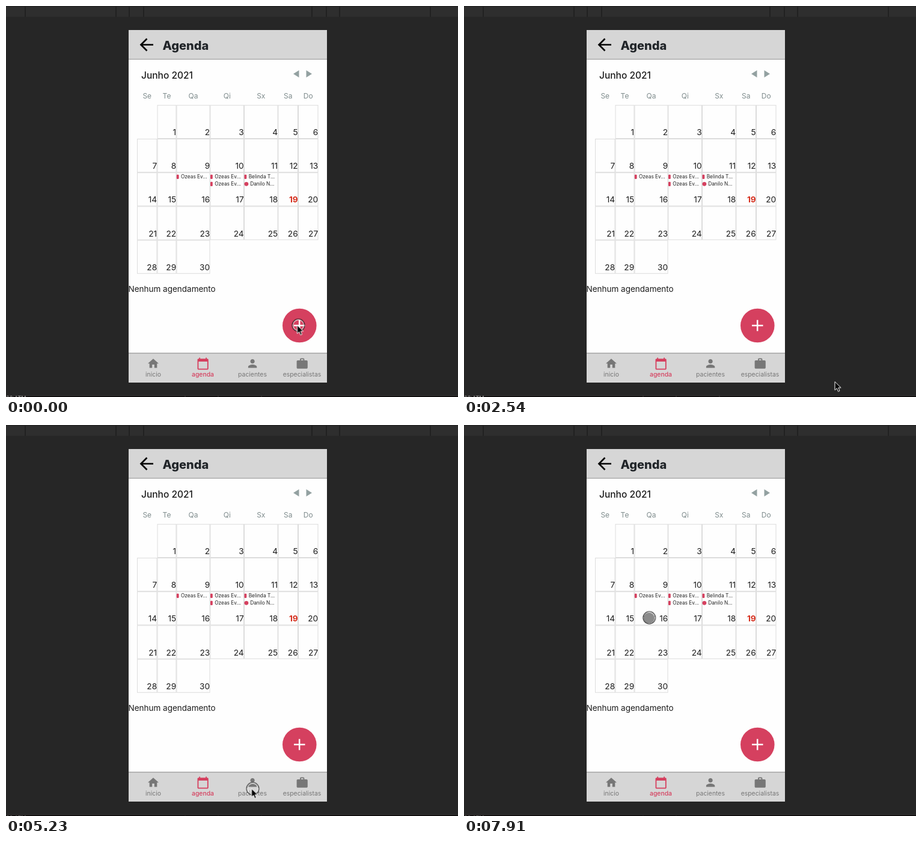
An HTML page for the animation above (8000 ms loop, 752 by 651 pixels).

```html
<!DOCTYPE html>
<html lang="pt">
<head>
<meta charset="utf-8">
<title>Agenda</title>
<style>
html, body { margin: 0; width: 100%; height: 100%; overflow: hidden; background: #262626; }
svg { display: block; width: 752px; height: 651px; font-family: Inter, "Open Sans", sans-serif; }
.title { font-size: 20px; font-weight: 800; fill: #212529; }
.month { font-size: 15.5px; font-weight: 500; fill: #1c1c1c; }
.week { font-size: 12px; fill: #7f8c8d; text-anchor: middle; }
.day { font-size: 13.7px; fill: #1c1c1c; text-anchor: end; }
.today { font-weight: 700; fill: #d6301f; }
.event { font-size: 8.3px; fill: #222; }
.note { font-size: 13.5px; fill: #1c1c1c; }
.tab { font-size: 10.4px; text-anchor: middle; }
.tabs { fill: #777; }
.active { fill: #d5405f; }
.active .tab { font-weight: 500; }
.cell { fill: none; stroke: #dcdcdc; }
.accent { fill: #d5405f; }
.strip { font-size: 9px; fill: #aaa; }

.pointer, .ring, .disc, .strip { animation: 8s step-end infinite; }
.pointer { animation-name: point; }
.ring { animation-name: ring; }
.disc { animation-name: touch; }
.strip { animation-name: strip; }

@keyframes point {
  0% { transform: translate(484.5px, 531.5px); }
  20.625% { transform: translate(487.5px, 538.5px); }
  22.5% { transform: translate(494px, 552px); }
  24.375% { transform: translate(513px, 578px); }
  26.25% { transform: translate(546px, 602px); }
  28% { transform: translate(580px, 616px); }
  29.875% { transform: translate(607px, 624px); }
  31.75% { transform: translate(617px, 625.5px); }
  33.625% { transform: translate(541px, 616px); }
  35.5% { transform: translate(480px, 608px); }
  37.375% { transform: translate(440px, 603px); }
  39.25% { transform: translate(418px, 601px); }
  41.125% { transform: translate(409px, 601px); }
  42.875% { transform: translate(406.5px, 602px); }
  46.625% { transform: translate(407.5px, 604px); }
  48.5% { transform: translate(408.5px, 605.5px); visibility: visible; }
  69.125%, 100% { transform: translate(408.5px, 605.5px); visibility: hidden; }
}
@keyframes ring {
  0% { transform: translate(486.5px, 531.5px); visibility: visible; }
  1.875% { transform: translate(410.5px, 605.5px); visibility: hidden; }
  65.375% { transform: translate(410.5px, 605.5px); visibility: visible; }
  67.25% { transform: translate(410.5px, 605.5px); visibility: hidden; }
  91.625% { transform: translate(410.5px, 599.5px); visibility: visible; }
  93.5% { transform: translate(404px, 560px); }
  95.25% { transform: translate(380px, 480px); }
  97.125% { transform: translate(336px, 376px); }
  98.875%, 100% { transform: translate(308.3px, 320.8px); visibility: visible; }
}
@keyframes touch {
  0% { transform: translate(410px, 605px); visibility: hidden; }
  69.125% { transform: translate(410px, 604px); visibility: visible; }
  71% { transform: translate(410px, 603px); }
  91.625% { transform: translate(410px, 600px); }
  93.5% { transform: translate(403.5px, 560.5px); }
  95.25% { transform: translate(379.5px, 480.5px); }
  97.125% { transform: translate(335.5px, 376.5px); }
  98.875%, 100% { transform: translate(307.8px, 321.3px); visibility: visible; }
}
@keyframes strip {
  0% { opacity: 1; transform: none; }
  65.375%, 100% { opacity: .6; transform: translateY(1px); }
}
</style>
</head>
<body>
<svg viewBox="0 0 752 651">
  <rect width="752" height="651" fill="#262626"/>
  <rect width="752" height="18" fill="#2e2e2e"/>
  <rect width="752" height="1.5" fill="#242424"/>
  <path d="M32 1v17M183 1v17M205 1v17M229 1v17M509 1v17M533 1v17M555 1v17M706 1v17" stroke="#1e1e1e" stroke-width="1.5"/>
  <rect y="648" width="752" height="1" fill="#383636"/>
  <rect y="649" width="752" height="2" fill="#110f0f"/>
  <g class="strip">
    <text x="0" y="656">00:ATM</text>
    <path d="M298 649v2M353 649v2M425 649v2" stroke="#3a3838"/>
  </g>

  <rect x="204" y="40" width="330" height="587" fill="#fefefe"/>
  <rect x="204" y="40" width="330" height="48" fill="#d6d6d6"/>
  <rect x="204" y="88" width="330" height="1.3" fill="#a2a2a2"/>
  <path d="M245 64.5H225.5M234.5 54.5l-10 10 10 10" fill="none" stroke="#000" stroke-width="2.7"/>
  <text class="title" x="260.5" y="73">Agenda</text>

  <text class="month" x="225" y="121">Junho 2021</text>
  <path d="M478 113l9.5-6v12zM509 113l-9.5-6v12z" fill="#93a1a1"/>
  <g id="calendar"></g>
  <text class="note" x="203.5" y="476">Nenhum agendamento</text>

  <circle class="accent" cx="488.3" cy="532" r="28.3"/>
  <path d="M479 532h18.5M488.2 522.7v18.5" stroke="#fff" stroke-width="2.5"/>

  <rect x="204" y="577.5" width="330" height="49.5" fill="#d6d6d6"/>
  <rect x="204" y="577.5" width="330" height="1.2" fill="#999"/>
  <g class="tabs">
    <path transform="translate(234.2 584.5) scale(.9)" d="M10 20v-6h4v6h5v-8h3L12 3 2 12h3v8z"/>
    <text class="tab" x="245" y="617">inicio</text>
    <g class="active">
      <path transform="translate(316.7 584.6) scale(.91)" d="M20 3h-1V1h-2v2H7V1H5v2H4c-1.1 0-2 .9-2 2v16c0 1.1.9 2 2 2h16c1.1 0 2-.9 2-2V5c0-1.1-.9-2-2-2zm0 18H4V8h16v13z"/>
      <text class="tab" x="327.5" y="617">agenda</text>
    </g>
    <path transform="translate(399.3 584.5) scale(.9)" d="M12 12c2.21 0 4-1.79 4-4s-1.79-4-4-4-4 1.79-4 4 1.79 4 4 4zm0 2c-2.67 0-8 1.34-8 4v2h16v-2c0-2.66-5.33-4-8-4z"/>
    <text class="tab" x="410" y="617">pacientes</text>
    <path transform="translate(481.8 584.6) scale(.91)" d="M20 6h-4V4c0-1.1-.9-2-2-2h-4c-1.1 0-2 .9-2 2v2H4c-1.1 0-2 .9-2 2v11c0 1.1.9 2 2 2h16c1.1 0 2-.9 2-2V8c0-1.1-.9-2-2-2zm-6 0h-4V4h4v2z"/>
    <text class="tab" x="492.5" y="617">especialistas</text>
  </g>

  <g class="ring" fill="none">
    <circle r="10.2" stroke="#000" stroke-width="1.1"/>
    <circle r="9.1" stroke="#fff" stroke-width="1.1"/>
  </g>
  <circle class="disc" r="9.3" fill="#000" fill-opacity=".45"/>
  <path class="pointer" d="M0 0V14L3.3 11 5.5 16.3 8 15.2 5.8 10H10.2Z" fill="#000" stroke="#fff"/>
</svg>
<script>
const calendar = document.getElementById('calendar');
const edges = [218, 251.5, 283.5, 339.5, 396, 452.5, 486, 519.5];
const top0 = 165, rowHeight = 56.2;

function add(tag, attrs, text = '') {
  const el = document.createElementNS('http://www.w3.org/2000/svg', tag);
  for (const key in attrs) el.setAttribute(key, attrs[key]);
  el.textContent = text;
  calendar.append(el);
}

['Se', 'Te', 'Qa', 'Qi', 'Sx', 'Sa', 'Do'].forEach((name, i) =>
  add('text', { class: 'week', x: (edges[i] + edges[i + 1]) / 2, y: 154 }, name));

for (let day = 1; day <= 30; day++) {
  const col = day % 7, row = Math.floor(day / 7);
  const left = edges[col], right = edges[col + 1], y = top0 + row * rowHeight;
  add('rect', { class: 'cell', x: left + .5, y: y + .3, width: right - left - 1, height: rowHeight - 1 });
  add('text', { class: day === 19 ? 'day today' : 'day', x: right - .3, y: y + 50 }, day);
}

function addEvent(x, y, name, round) {
  if (round) add('circle', { class: 'accent', cx: x + 3.7, cy: y - 2.7, r: 3.4 });
  else add('rect', { class: 'accent', x, y: y - 6.2, width: 3.8, height: 7.2, rx: 1.3 });
  add('text', { class: 'event', x: x + (round ? 10 : 7.2), y }, name);
}
addEvent(283.8, 287, 'Ozeas Ev...');
addEvent(340, 287, 'Ozeas Ev...');
addEvent(340, 299, 'Ozeas Ev...');
addEvent(396.5, 287, 'Belinda T...');
addEvent(396.2, 299, 'Danilo N...', true);
</script>
</body>
</html>
```
